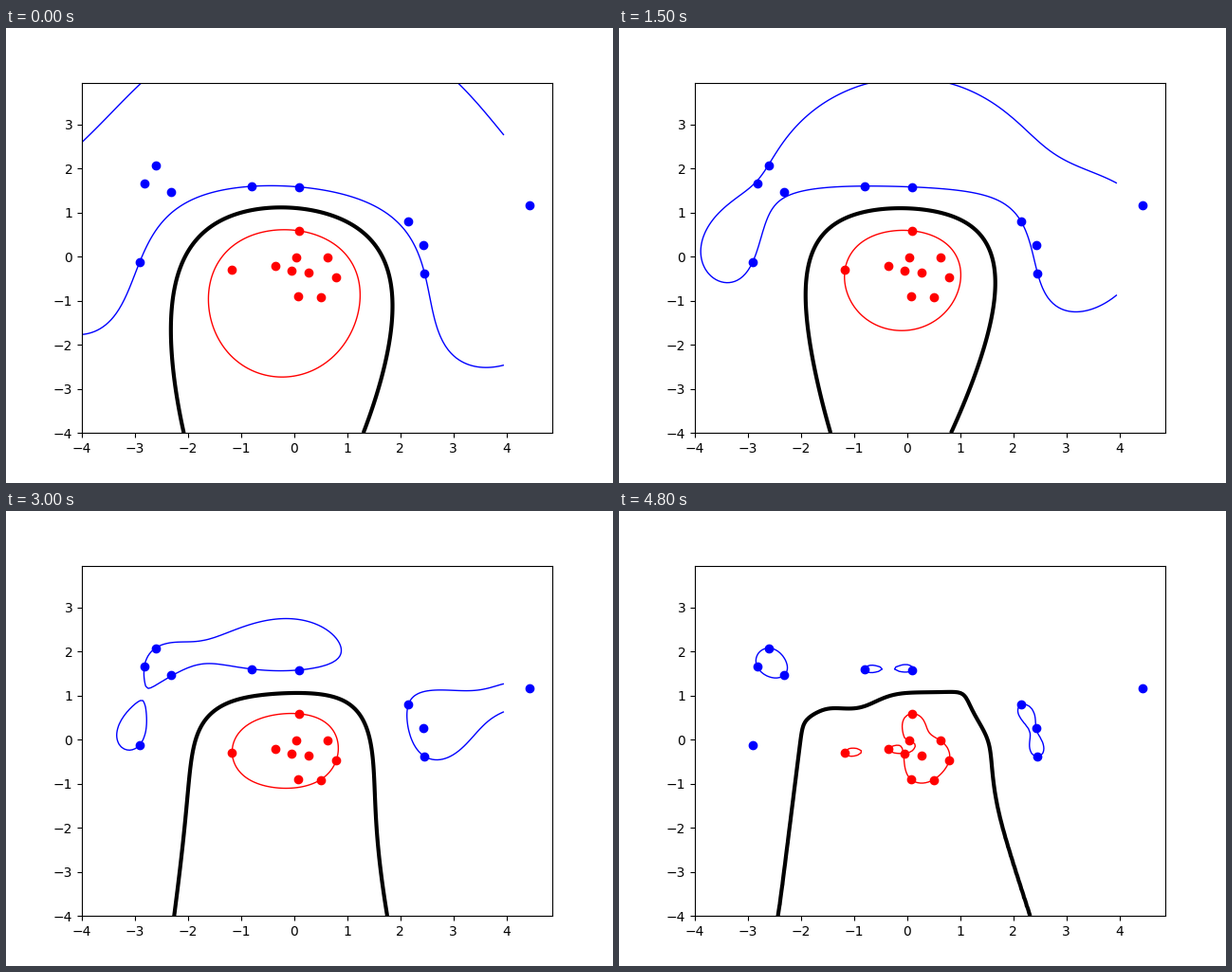
A matplotlib script for the animation above (5.1 s loop, 640 by 480 pixels).

```python
import random

import matplotlib.pyplot as plt
import numpy as np
from matplotlib.animation import FuncAnimation

FRAMES, INTERVAL = 17, 300
SIGMAS = np.linspace(2.0, 0.4, FRAMES)


def cluster(n, cx, cy, sd):
    return [(random.normalvariate(cx, sd), random.normalvariate(cy, sd))
            for _ in range(n)]


def rbf(a, b, sigma):
    d2 = ((a[:, None] - b[None]) ** 2).sum(axis=2)
    return np.exp(-d2 / (2 * sigma ** 2))


def solve_dual(P, tol=1e-8):
    """Minimise a'Pa/2 - sum(a) with a >= 0 by an active-set search."""
    n = len(P)
    a = np.zeros(n)
    free = np.zeros(n, bool)

    def solve():
        z = np.zeros(n)
        z[free] = np.linalg.solve(P[np.ix_(free, free)], np.ones(free.sum()))
        return z

    for _ in range(300):
        grad = np.where(free, -np.inf, 1 - P @ a)
        if grad.max() <= tol:
            break
        free[grad.argmax()] = True
        z = solve()
        while (z[free] <= 0).any():
            bad = free & (z <= 0)
            a += (a[bad] / (a[bad] - z[bad])).min() * (z - a)
            free &= a > 1e-12
            a[~free] = 0
            z = solve()
        a = z
    return a


random.seed(100)
blue = np.array(cluster(5, -1.5, 0.5, 1) + cluster(5, 1.5, 0.5, 1))
red = np.array(cluster(10, 0, -0.5, 0.5))
points = np.vstack([blue, red])
label = np.repeat([1.0, -1.0], [len(blue), len(red)])

axis = np.arange(-4, 4, 0.05)
X, Y = np.meshgrid(axis, axis)
grid = np.column_stack([X.ravel(), Y.ravel()])


def indicator(sigma):
    alpha = solve_dual(np.outer(label, label) * rbf(points, points, sigma))
    return (rbf(grid, points, sigma) @ (alpha * label)).reshape(X.shape)


fig, ax = plt.subplots(figsize=(6.4, 4.8), dpi=100)
ax.plot(*blue.T, 'bo')
ax.plot(*red.T, 'ro')
right = points[:, 0].max()
xlim = (-4, right + 0.05 * (right + 4))
ylim = (-4, axis[-1])
shown = []


def update(i):
    while shown:
        shown.pop().remove()
    shown.append(ax.contour(X, Y, indicator(SIGMAS[i]), levels=(-1, 0, 1),
                            colors=('red', 'black', 'blue'),
                            linewidths=(1, 3, 1), linestyles='solid'))
    ax.set(xlim=xlim, ylim=ylim)
    return shown


anim = FuncAnimation(fig, update, frames=FRAMES, interval=INTERVAL,
                     init_func=lambda: [], repeat=True, repeat_delay=0)
plt.show()
```
